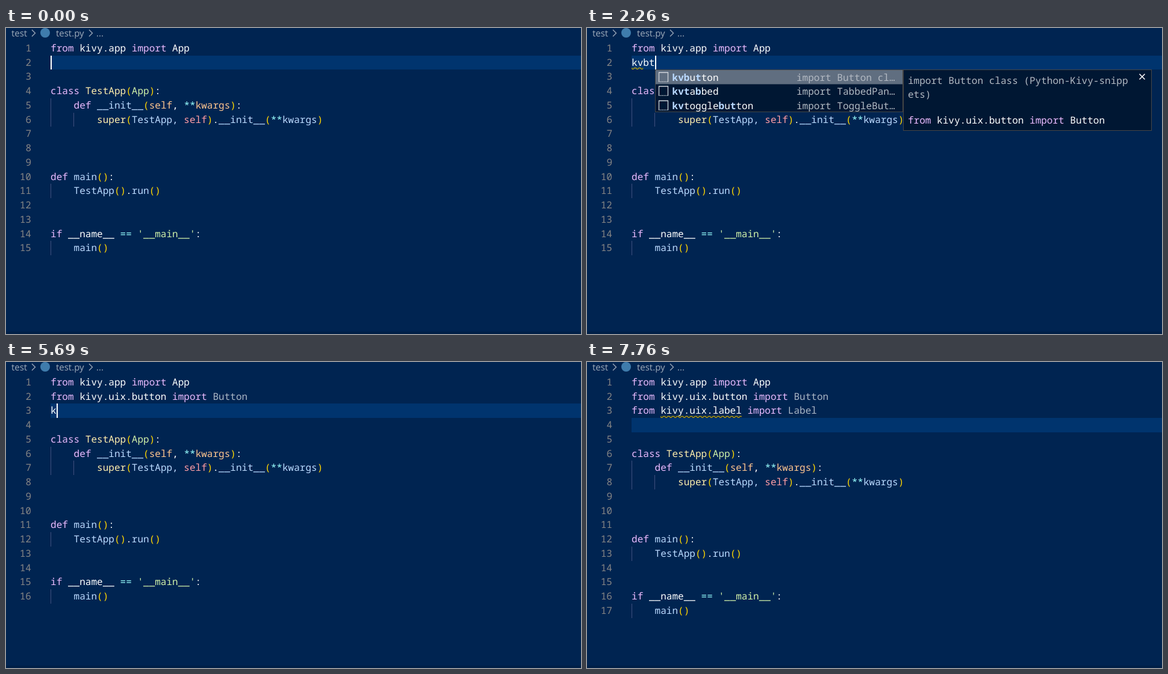
Write an HTML page that moves like this. It is 955 by 509 pixels and loops after 8000 ms.

```html
<!DOCTYPE html>
<html lang="en">
<head>
<meta charset="utf-8">
<title>Snippet completion</title>
<style>
  html, body { margin: 0; width: 100%; height: 100%; overflow: hidden; background: #002451; }
  svg { display: block; }
  text { font: 16.05px "Noto Sans Mono", "DejaVu Sans Mono", monospace; white-space: pre; text-rendering: geometricPrecision; }
  .crumb { font: 15px "Open Sans", "Noto Sans", sans-serif; fill: #9fabba; }
  .num { fill: #858585; text-anchor: end; }
  .w { fill: #fff; }
  .k { fill: #ebbbff; }
  .f { fill: #bbdaff; }
  .c { fill: #ffeead; }
  .s { fill: #d1f1a9; }
  .a { fill: #ffc58f; }
  .v { fill: #ff9da4; }
  .o { fill: #99ffff; }
  .p { fill: #ffd700; }
  .d { fill: #aab6c5; }
  .m { fill: #b2b9c2; }
  .h { fill: #bbdaff; font-weight: 700; }
</style>
</head>
<body>
<svg width="955" height="509" viewBox="0 0 955 509">
  <defs>
    <pattern id="wave" width="6" height="3" patternUnits="userSpaceOnUse">
      <path fill="#cca700" d="M5.5 0 2.5 3H1.1L4.1 0zM4 0 6 2V.6L5.4 0zM0 2 1 3H2.4L0 .6z"/>
    </pattern>
  </defs>
  <rect width="955" height="509" fill="#002451"/>
  <rect y="505" width="955" height="4" fill="#001f47"/>
  <text class="crumb" x="9" y="14">test</text>
  <text class="crumb" x="83" y="14">test.py</text>
  <text class="crumb" x="150" y="14">...</text>
  <path d="M43 3l5.5 5.5-5.5 5.5M138 3l5.5 5.5-5.5 5.5" fill="none" stroke="#9fabba" stroke-width="1.3"/>
  <circle cx="65" cy="8" r="8" fill="#3f7cac"/>
  <g id="editor"></g>
</svg>
<script>
const LOOP = 8000, LINE = 23.75, CHAR = 9.63, LEFT = 74.1, FIRST = 21.8;
const editor = document.getElementById('editor');

// In markup, "~x" switches to the colour class x.
const head = '~kfrom~w kivy.app ~kimport~w App';
const body = [
  '',
  '~kclass ~cTestApp~p(~sApp~p)~w:',
  '~w    ~kdef ~f__init__~p(~aself~w, ~o**~akwargs~p)~w:',
  '~w        ~csuper~p(~fTestApp, ~vself~p)~w.~f__init__~p(~o**~fkwargs~p)',
  '', '', '',
  '~kdef ~fmain~p()~w:',
  '~w    ~fTestApp~p()~w.~frun~p()',
  '', '',
  "~kif ~w__name__ ~o== ~s'__main__'~w:",
  '~w    ~fmain~p()'
];
const importLine = (module, name, cls = 'w') => `~kfrom~w ${module} ~kimport~${cls} ${name}`;
const button = importLine('kivy.uix.button', 'Button', 'd');
const label = importLine('kivy.uix.label', 'Label', 'd');

const cls = name => `import ${name} class`;
const box = ['kvbox', cls('BoxLayout')], bubble = ['kvbubble', cls('Bubble')],
  btn = ['kvbutton', cls('Button')], check = ['kvcheckbox', cls('CheckBox')],
  clock = ['kvclk', cls('Clock')], toggle = ['kvtogglebutton', cls('ToggleButton')],
  tabbed = ['kvtabbed', cls('TabbedPanel')], lab = ['kvlabel', cls('Label')],
  eb = ['kveb', 'Code snippet for event binding'],
  files = ['kvfilechooser', cls('FileChooser')],
  fileIcons = ['kvfilechoosericon', cls('FileChooserIconView')],
  anim = 'from kivy.animation import Animation class';

const all = {
  query: 'kv', total: 40, about: anim, code: importLine('kivy.animation', 'Animation'),
  rows: [['kvanim', anim], ['kvanimtrans', anim], box, bubble, btn, check, clock,
    ['kvdrop', cls('DropDown')], eb, ['kvev', 'Code snippet for event'], files, fileIcons]
};
const forB = {
  query: 'kvb', about: box[1], code: importLine('kivy.uix.boxlayout', 'BoxLayout'),
  rows: [box, bubble, btn, eb, tabbed, lab, check, toggle]
};
const forBt = {
  query: 'kvbt', about: btn[1], code: importLine('kivy.uix.button', 'Button'),
  rows: [btn, tabbed, toggle]
};
const forBtn = { ...forBt, query: 'kvbtn', rows: [btn, toggle] };
const forL = {
  query: 'kvl', total: 14, about: lab[1], code: importLine('kivy.uix.label', 'Label'),
  rows: [lab, ['kvload', 'Builder.load_file()'], clock, ['kvfloat', cls('FloatLayout')], files,
    ['kvfilechoosericon', cls('Spinner')], fileIcons, ['kvrelative', cls('RelativeLayout')],
    ['kvtslider', cls('Slider')], bubble, ['kvtemplate', "basic App's declaration"], toggle]
};

// Each step changes part of the state; wave is [line, first column, end column].
const off = { caret: false }, on = { caret: true };
const steps = [
  [0, { done: [], typed: '', caret: true, list: null, bar: 0, wave: null }],
  [380, off], [860, on], [1410, off],
  [1560, { typed: '~wk', caret: true }],
  [1710, { typed: '~wkv', list: all, bar: 0.15 }],
  [1800, { bar: 0.4 }],
  [1880, { typed: '~wkvb', list: forB }],
  [2050, { wave: [2, 0, 2] }],
  [2260, { typed: '~wkvbt', list: forBt }],
  [2340, { typed: '~wkvbtn', list: forBtn }],
  [2490, off],
  [2570, { typed: button, caret: true, list: null }],
  [3030, off],
  [3200, { done: [button], typed: '', wave: null }],
  [3270, on], [3730, off], [4280, on], [4740, off], [5290, on],
  [5690, { typed: '~wk' }],
  [5840, { typed: '~wkv', list: all, bar: 0.15 }],
  [5920, { bar: 0.4 }],
  [6070, { typed: '~wkvl', list: forL, bar: 0.15, wave: [3, 0, 2] }],
  [6150, { bar: 0.4 }],
  [6450, off],
  [6530, { typed: label, caret: true, list: null }],
  [6690, { wave: [3, 0, 3] }],
  [6990, off],
  [7220, { done: [button, label], typed: '' }],
  [7300, { caret: true, wave: [3, 5, 19] }],
  [7760, off]
];

const plain = markup => markup.replace(/~./g, '');
const lineTop = n => Math.round(FIRST + LINE * (n - 1));
const columnX = col => Math.round(LEFT + CHAR * col);
const rect = (x, y, w, h, fill, extra = '') =>
  `<rect x="${x}" y="${y}" width="${w}" height="${h}" fill="${fill}" ${extra}/>`;
const panel = (x, y, w, h) => rect(x + 0.5, y + 0.5, w - 1, h - 1, '#001733', 'stroke="#454545"');

function text(x, y, markup) {
  const spans = markup.split('~').slice(1).map(s => `<tspan class="${s[0]}">${s.slice(1)}</tspan>`);
  return `<text x="${x}" y="${y}">${spans.join('')}</text>`;
}

function matches(name, query) {
  const hits = [];
  for (const ch of query) {
    let at = name.indexOf(ch, hits.length ? hits[hits.length - 1] + 1 : 0);
    if (at < 0) at = name.indexOf(ch);
    hits.push(at);
  }
  return hits;
}

function snippetRow([name, detail], query, x, y) {
  const hits = matches(name, query);
  const marked = [...name].map((ch, i) => (hits.includes(i) ? '~h' : '~w') + ch).join('');
  const short = detail.length > 17 ? detail.slice(0, 16) + '…' : detail;
  return `<path d="M${x + 6.5} ${y + 1}v-15h15v15" fill="none" stroke="#d0d4da" stroke-width="1.3"/>
    <path d="M${x + 6} ${y + 1.4}h17" stroke="#d0d4da" stroke-width="1.3" stroke-dasharray="1.6 1.2"/>` +
    text(x + 28.6, y, marked) + text(x + 235, y, '~m' + short);
}

function suggestions({ query, rows, total, about, code }, bar, line) {
  const x = columnX(query.length), top = lineTop(line + 1), exact = FIRST + LINE * line;
  const height = Math.round(rows.length * LINE), docs = x + 412;
  const baseline = offset => Math.round(exact + offset) + 6;
  const note = `${about} (Python-Kivy-snippets)`;
  let out = panel(x, top, 412, height) + rect(x + 1, top + 1, 410, 23.5, '#606e80');
  out += rows.map((row, i) => snippetRow(row, query, x, baseline(12.3 + LINE * i))).join('');
  if (total) {
    out += rect(x + 399, top + 1, 12, Math.round(height * rows.length / total), '#797979', `opacity="${bar}"`);
  }
  out += panel(docs, top, 413, 102);
  out += text(x + 420, baseline(17.3), '~m' + note.slice(0, 38));
  out += text(x + 420, baseline(40.5), '~m' + note.slice(38));
  out += text(x + 420, baseline(83.4), code);
  return out + `<path d="M${x + 804.5} ${top + 7.5}l9 9m0-9l-9 9" stroke="#fff" stroke-width="1.5"/>`;
}

function codeLine(markup, n) {
  const y = lineTop(n), indent = plain(markup).search(/\S|$/) / 4;
  let out = `<text class="num" x="42" y="${y + 17}">${n}</text>`;
  for (let i = 0; i < indent; i++) {
    out += rect(Math.floor(LEFT + CHAR * 4 * i), y, 1, lineTop(n + 1) - y, '#404f7d');
  }
  return out + text(LEFT, y + 17, markup);
}

function render({ done, typed, caret, list, bar, wave }) {
  const line = done.length + 2, y = lineTop(line), height = lineTop(line + 1) - y;
  let out = rect(74, y, 881, height, '#00346e');
  out += [head, ...done, typed, ...body].map((s, i) => codeLine(s, i + 1)).join('');
  if (wave) {
    const [row, from, to] = wave;
    out += `<g transform="translate(${columnX(from)} ${lineTop(row + 1) - 3.75}) scale(1.25)">` +
      rect(0, 0, (to - from) * CHAR / 1.25, 3, 'url(#wave)') + '</g>';
  }
  if (list) out += suggestions(list, bar, line);
  if (caret) out += rect(columnX(plain(typed).length), y, 2, height, '#fff');
  editor.innerHTML = out;
}

let shown = -1;
function frame(now) {
  const t = now % LOOP;
  const index = steps.filter(([start]) => start <= t).length - 1;
  if (index !== shown) {
    shown = index;
    render(Object.assign({}, ...steps.slice(0, index + 1).map(step => step[1])));
  }
}

const start = performance.now();
function tick() {
  frame(performance.now() - start);
  requestAnimationFrame(tick);
}
tick();
</script>
</body>
</html>
```
